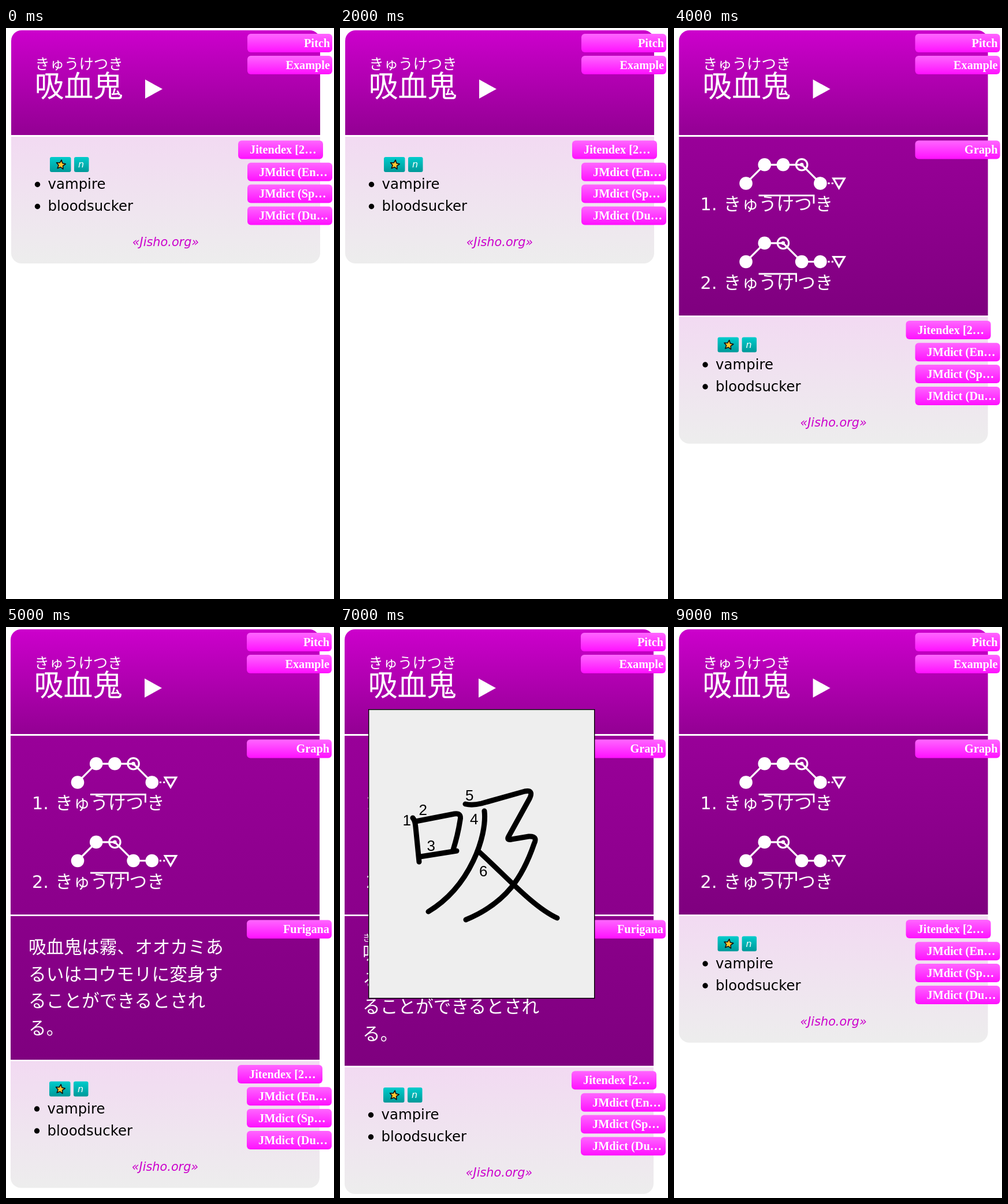
Animation of 568x987 px, one loop 10 s. Source, as an HTML page:

```html
<!DOCTYPE html>
<html lang="ja">
<head>
<meta charset="utf-8">
<style>
  html, body { margin: 0; width: 100%; height: 100%; overflow: hidden; background: #fff; }
  svg { display: block; width: 568px; height: 987px; }
  .jp { font-family: "Noto Sans CJK JP", "Noto Sans CJK", sans-serif; fill: #fff; }
  .latin { font-family: "DejaVu Sans", sans-serif; }
  .tab { font: bold 20.3px "Liberation Serif", serif; fill: #fff; }
  .order { font: 26px "Liberation Sans", sans-serif; }
  .line { fill: none; stroke: #fff; stroke-width: 3.2; }
  .ink { fill: none; stroke: #000; stroke-width: 9; stroke-linecap: round; stroke-linejoin: round; }
</style>
</head>
<body>
<svg viewBox="0 0 568 987">
  <defs id="gradients"></defs>
  <g id="scene"></g>
</svg>
<script>
const gradients = {
  head: ['#cc00cc', '#930093'],
  body: ['#990099', '#7f007f'],
  meaning: ['#f2daf2', '#ededed'],
  tab: ['#ff66ff', '#ff10ff'],
  badge: ['#00cccc', '#009999'],
};
document.getElementById('gradients').innerHTML = Object.entries(gradients).map(([id, [top, bottom]]) =>
  `<linearGradient id="${id}" x2="0" y2="1"><stop stop-color="${top}"/><stop offset="1" stop-color="${bottom}"/></linearGradient>`).join('');

const text = (x, y, str, cls, size, extra = '') =>
  `<text x="${x}" y="${y}" class="${cls}" ${size ? `font-size="${size}"` : ''} ${extra}>${str}</text>`;
const rect = (x, y, w, h, fill, r = 0) =>
  `<rect x="${x}" y="${y}" width="${w}" height="${h}" rx="${r}" fill="${fill ? `url(#${fill})` : '#fff'}"/>`;
const path = (d, cls, extra = '') => `<path d="${d}" class="${cls}" ${extra}/>`;

function tab(y, label, { x = 418, left = false } = {}) {
  return rect(x, y, 147, 32, 'tab', 6) +
    text(left ? x + 20 : x + 143, y + 22.7, label, 'tab', 0, left ? '' : 'text-anchor="end"');
}

function header() {
  return path('M9 185V22a18 18 0 0 1 18-18H526a18 18 0 0 1 18 18V185Z', '', 'fill="url(#head)"') +
    text(50.3, 70.5, 'きゅうけつき', 'jp', 25.4) +
    text(49.8, 119, '吸血鬼', 'jp', 50.8) +
    path('M241 89V122L271 105.5Z', '', 'fill="#fff"') +
    tab(10, 'Pitch') + tab(48, 'Example');
}

// Pitch contour: high/low per mora, with a ring on the mora before the drop.
function pitchGraph(y, levels, drop) {
  const points = [...levels].map((level, i) => [125 + 32.2 * i, level === 'H' ? y - 32.2 : y]);
  const dots = points.map(([x, cy], i) => i === drop
    ? `<circle cx="${x}" cy="${cy}" r="9.7" class="line"/><circle cx="${x}" cy="${cy}" r="3.2" fill="#fff"/>`
    : `<circle cx="${x}" cy="${cy}" r="11.3" fill="#fff"/>`).join('');
  return path('M' + points.join('L'), 'line') + dots +
    path(`M254 ${y}H279`, 'line', 'stroke-dasharray="3.2"') +
    path(`M286 ${y + 8.4}l9.7-16.8h-19.4Z`, 'line');
}

function pitchText(y, number, high, rest) {
  const end = 147 + 30.4 * high.length + 5.2;
  return text(46, y, number + '.', 'latin', 30.3, 'fill="#fff"') +
    text(86.2, y, 'きゅ' + high, 'jp', 30.6) + text(end + 1.6, y, rest, 'jp', 30.6) +
    path(`M147 ${y - 25.5}H${end - 1}v14`, 'line', 'style="stroke-width:2.8"');
}

function pitch(graph) {
  const shift = graph ? 0 : -65.5;
  return pitchText(315 + shift, 1, 'うけつ', 'き') +
    pitchText(450.5 + 2 * shift, 2, 'うけ', 'つき') +
    (graph ? pitchGraph(268.5, 'LHHHL', 3) + pitchGraph(404, 'LHHLL', 2) : '') +
    tab(194.5, 'Graph');
}

function example(furigana) {
  const top = furigana ? 574 : 564;
  const lines = ['吸血鬼は霧、オオカミあ', 'るいはコウモリに変身す', 'ることができるとされ', 'る。'];
  const ruby = [[40.3, 543.3, 'きゅうけつき'], [163, 543.3, 'きり'], [285.8, 590.5, 'へんしん']];
  return rect(9, 497, 535, 2.6) +
    lines.map((line, i) => text(40, top + 46.5 * i, line, 'jp', 30.7)).join('') +
    (furigana ? ruby.map(([x, y, kana]) => text(x, y, kana, 'jp', 15.4)).join('') : '') +
    tab(506.5, 'Furigana');
}

function star(cx, cy) {
  const points = Array.from({ length: 10 }, (_, i) => {
    const a = (i * 36 - 82) * Math.PI / 180, r = i % 2 ? 4 : 8.4;
    return [cx + r * Math.cos(a), cy + r * Math.sin(a)];
  });
  return `<polygon points="${points}" fill="#ffc72e" stroke="#111" stroke-width="1.6" stroke-linejoin="round"/>`;
}

function meaning() {
  const words = ['vampire', 'bloodsucker'];
  const sources = ['JMdict (En…', 'JMdict (Sp…', 'JMdict (Du…'];
  return path('M9 0H544V201a18 18 0 0 1-18 18H27a18 18 0 0 1-18-18Z', '', 'fill="url(#meaning)"') +
    rect(76, 35, 36.5, 26, 'badge', 3) + rect(118, 35, 25.5, 26, 'badge', 3) +
    star(95, 48.5) + text(130, 53, 'n', 'latin', 16, 'fill="#fff" font-style="italic" text-anchor="middle"') +
    words.map((word, i) => `<circle cx="54.5" cy="${82.5 + 38 * i}" r="4.7"/>` +
      text(72.5, 90 + 38 * i, word, 'latin', 24.4)).join('') +
    text(276.5, 189, '«Jisho.org»', 'latin', 20.8, 'fill="#cc00cc" font-style="italic" text-anchor="middle"') +
    tab(6.5, 'Jitendex [2…', { x: 402, left: true }) +
    sources.map((name, i) => tab(44.8 + 37.8 * i, name, { left: true })).join('');
}

function strokeOrder() {
  const strokes = [
    'M126 330Q130 334 131 346L137 406',
    'M131 336L198 323Q211 321 208 334Q204 360 196 385',
    'M139 397L202 387',
    'M250 318C255 360 226 448 153 492',
    'M217 306Q229 309 245 305L320 284Q336 281 328 297L292 362Q288 369 297 367L327 362Q343 361 336 375C317 430 290 476 218 506',
    'M239 387C285 428 334 484 376 503',
  ];
  const labels = [[108.5, 343], [136.5, 324.5], [150.5, 387], [225, 341], [217, 300], [241, 431]];
  return '<rect x="49.7" y="142.7" width="391" height="499" fill="#eee" stroke="#000" stroke-width="1.4"/>' +
    strokes.map(d => path(d, 'ink')).join('') +
    labels.map(([x, y], i) => text(x, y, i + 1, 'order')).join('');
}

function draw({ top = 188, dx = 0, graph, furigana, popup }) {
  const open = top > 188;
  return `<g transform="translate(${dx})">` + header() +
    (open ? rect(9, 188, 535, top - 190.5, 'body') + pitch(graph) : '') +
    (top > 700 ? example(furigana) : '') +
    `<g transform="translate(0 ${top})">${meaning()}</g></g>` +
    (popup ? strokeOrder() : '');
}

const closed = {};
const pitchOnly = { top: 368.5, dx: -.3 };
const withGraph = { top: 499.5, dx: -.4, graph: true };
const withExample = { top: 750.5, dx: -1, graph: true };
const withFurigana = { top: 761, dx: -1, graph: true, furigana: true };
const withPopup = { ...withFurigana, popup: true };

// One state per second.
const timeline = [closed, closed, closed, pitchOnly, withGraph, withExample,
  withFurigana, withPopup, withFurigana, withGraph];

const scene = document.getElementById('scene');
const start = performance.now();
let shown = null;

function tick() {
  const elapsed = Math.max(0, performance.now() - start);
  const state = timeline[Math.floor(elapsed / 1000) % timeline.length];
  if (state !== shown) {
    scene.innerHTML = draw(state);
    shown = state;
  }
  requestAnimationFrame(tick);
}
tick();
</script>
</body>
</html>
```
